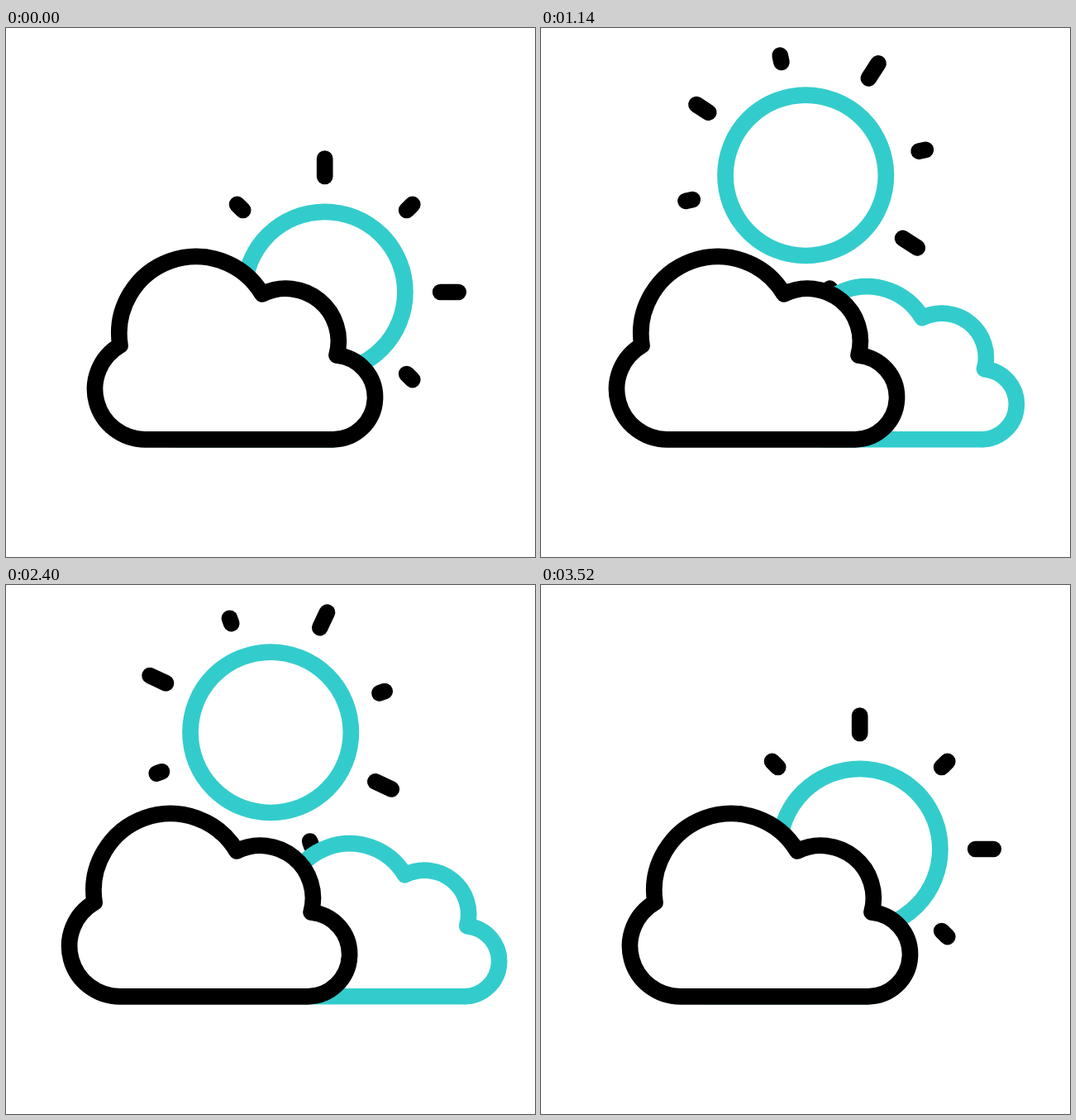
An HTML page that plays this animation: 640 by 640 pixels, repeating every 3.6 s.

```html
<!DOCTYPE html>
<html lang="en">
<head>
<meta charset="utf-8">
<title>Sun and clouds</title>
<style>
  html, body { margin: 0; width: 100%; height: 100%; overflow: hidden; background: #fff; }
  svg { display: block; width: 100%; height: 100%; }
  .line { fill: #fff; stroke: #000; stroke-width: 19.7; stroke-linecap: round; stroke-linejoin: round; }
  .teal { stroke: #3cc; }
  #back { stroke-width: 23.5; }
</style>
</head>
<body>
<svg viewBox="0 0 640 640">
  <defs>
    <path id="cloud" d="M138 384A93.1 93.1 0 0 1 310 322A63.7 63.7 0 0 1 400 396A51 51 0 0 1 395 497.8H168.5A61 61 0 0 1 138 384Z"/>
  </defs>
  <g id="sun">
    <circle class="line teal" r="97.2"/>
    <g id="rays"></g>
  </g>
  <use id="back" class="line teal" href="#cloud"/>
  <use id="front" class="line" href="#cloud"/>
</svg>
<script>
const LOOP = 3600;
const GROUND = 497.8;
const BACK_SCALE = 0.836;
const $ = id => document.getElementById(id);

// A power below 1 makes the move leave faster.
const smooth = (power = 1) => u => (u **= power) * u * (3 - 2 * u);
const slowing = power => u => 1 - (1 - u) ** power;

// Keys are [time, value, ease used to get there].
function track(...keys) {
  return t => {
    const i = keys.findIndex(key => key[0] > t);
    if (i < 0) return keys[keys.length - 1][1];
    if (i === 0) return keys[0][1];
    const [t0, v0] = keys[i - 1];
    const [t1, v1, ease = smooth()] = keys[i];
    return v0 + (v1 - v0) * ease((t - t0) / (t1 - t0));
  };
}

const frontX = track([234, 0], [834, -31], [1570, -2.6, smooth(0.75)], [2430, -31], [2970, 0, smooth(0.75)]);
const backX = track([234, -158], [834, 3], [1570, -37.6, smooth(0.75)], [2430, 3], [3496, -158, smooth(0.56)]);
const sunX = track([80, 385.7], [640, 320.2], [2430, 320.2], [2900, 385.7]);
const sunY = track([80, 319.5], [620, 178.3], [2515, 178.3], [3110, 344.3], [3400, 319.5]);
const turn = track([80, 0], [540, 45.4], [2250, 18, slowing(1.4)], [2700, 45.4], [3400, 0]);

// Short rays shrink while the sun is high; long ones dip one after another.
const shortRay = track([780, 10], [1520, 6.7], [2700, 6.7], [3120, 10]);
const longRay = (t, i) => 21.5 - 4 * Math.exp(-(((t - 1950 + 130 * i) / 400) ** 2));

const rays = Array.from({ length: 8 }, (_, i) => {
  const ray = document.createElementNS('http://www.w3.org/2000/svg', 'path');
  ray.setAttribute('class', 'line');
  ray.setAttribute('transform', `rotate(${i * 45})`);
  return $('rays').appendChild(ray);
});

const place = (id, value) => $(id).setAttribute('transform', value);

function draw(now) {
  const t = now % LOOP;
  place('sun', `translate(${sunX(t)} ${sunY(t)})`);
  place('rays', `rotate(${turn(t)})`);
  rays.forEach((ray, i) => {
    const length = i % 2 ? shortRay(t) : longRay(t, i);
    ray.setAttribute('d', `M0 -140v${-length}`);
  });
  place('back', `translate(${220.5 + backX(t)} ${GROUND * (1 - BACK_SCALE)}) scale(${BACK_SCALE})`);
  place('front', `translate(${frontX(t)} 0)`);
}

const start = performance.now();
function tick() {
  draw(performance.now() - start);
  requestAnimationFrame(tick);
}
tick();
</script>
</body>
</html>
```
